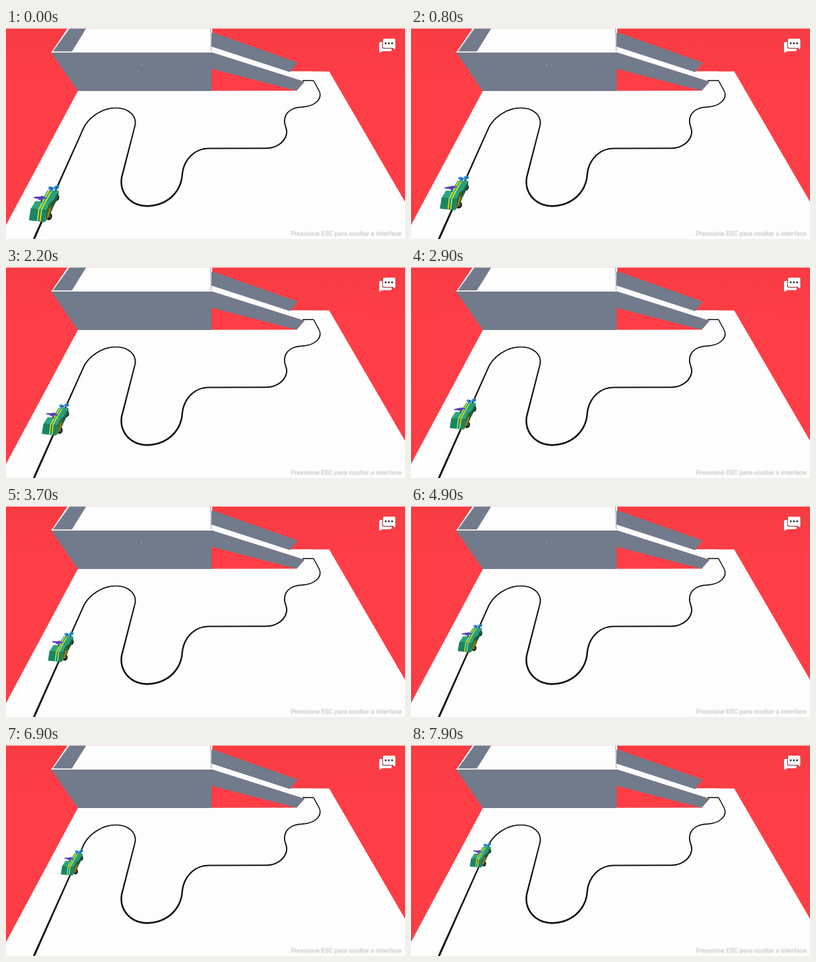
Recreate the animation shown at these times as an HTML page with a canvas. Size 600 px wide and 318 px high, loop 8 s.

```html
<!DOCTYPE html>
<html lang="pt">
<head>
<meta charset="utf-8">
<style>
html, body { margin: 0; width: 600px; height: 318px; overflow: hidden; background: #fdfdfd; }
canvas { position: absolute; left: 0; top: 0; }
#hint {
  position: absolute; right: 5px; bottom: 2px; white-space: nowrap;
  font: 9.8px/12px Roboto, "Liberation Sans", sans-serif;
  color: #d6d6d6; text-shadow: 0 0 2px #c4c4c4;
}
</style>
</head>
<body>
<canvas id="stage" width="600" height="318"></canvas>
<div id="hint">Pressione ESC para ocultar a interface</div>
<script>
const ctx = document.getElementById('stage').getContext('2d');
const W = 600, H = 318, LOOP = 8000, STEP = 100;
const WHITE = '#fdfdfd', GRAY = '#727b8b';

const track = new Path2D(
  'M42 318L117 150C125 134 145 120.5 165 120.5C184 120.5 197 132 194 147' +
  'L174 225C170 250 189 268.3 212 268.3C240 268.3 263 249 265 221' +
  'C267 199 283 181.5 305 181.5L391 181.2C410 181 423 168 422 155' +
  'C421 147 418 146 419 138C420 127 430 119.5 445 119.2' +
  'C466 118 476 106 471 95L462.5 79.3L446 79.3');

function outline(p) {
  ctx.beginPath();
  for (let i = 0; i < p.length; i += 2) ctx.lineTo(p[i], p[i + 1]);
}

function poly(color, ...p) {
  outline(p);
  ctx.fillStyle = color;
  ctx.fill();
}

function line(color, width, ...p) {
  outline(p);
  ctx.strokeStyle = color;
  ctx.lineWidth = width;
  ctx.stroke();
}

function oval(color, x, y, rx, ry, turn = 0) {
  ctx.fillStyle = color;
  ctx.beginPath();
  ctx.ellipse(x, y, rx, ry, turn, 0, Math.PI * 2);
  ctx.fill();
}

function round(color, x, y, w, h, r) {
  ctx.fillStyle = color;
  ctx.beginPath();
  ctx.roundRect(x, y, w, h, r);
  ctx.fill();
}

// the line gets thinner with distance, so it is drawn in level bands
function drawTrack() {
  const band = 10;
  ctx.strokeStyle = '#111';
  ctx.lineJoin = 'round';
  for (let y = 70; y < H; y += band) {
    ctx.save();
    ctx.beginPath();
    ctx.rect(0, y, W, band);
    ctx.clip();
    ctx.lineWidth = 0.9 + y / 145;
    ctx.stroke(track);
    ctx.restore();
  }
}

function drawScene() {
  const wall = ctx.createLinearGradient(0, 0, 0, H);
  wall.addColorStop(0, '#f83b42');
  wall.addColorStop(0.3, '#ff3e47');
  wall.addColorStop(1, '#fc3d46');
  ctx.fillStyle = wall;
  ctx.fillRect(0, 0, W, H);

  // floor
  poly(WHITE, 108, 95, 437, 94.5, 449, 81, 427, 65.5, 486, 65.5, 600, 262, W, H, 0, H, 0, 297);

  // platform
  poly(WHITE, 93, 0, 309, 0, 309, 38, 68, 37);
  poly(GRAY, 70.5, 35.5, 96, 0, 121, 0, 99, 35.5);
  poly(GRAY, 68, 37, 309, 37, 309, 95, 108, 95);
  line(WHITE, 1.3, 68, 36.4, 309, 36.4);
  line('#9aa1ad', 1, 307.5, 0, 308.5, 35);
  line(WHITE, 1.3, 309.5, 0, 309.5, 20);
  oval('#aab0ba', 204, 55.5, 0.9, 0.7);

  // ramp
  poly(WHITE, 309, 26, 426, 65.5, 462, 65.5, 449, 81, 309, 37);
  poly(GRAY, 309, 7, 316, 8.5, 438.5, 52, 427, 66.5, 309, 28);
  poly(GRAY, 309, 36.5, 449, 81, 437, 94.5, 309, 61.5);
  line('#f6dcdd', 1, 0, 0.5, W, 0.5);
}

function drawChat() {
  round(WHITE, 561, 21, 19, 14, 2);
  poly(WHITE, 561.3, 33, 567, 34.5, 561.3, 37.5);
  round('#8c2a30', 565.7, 16, 20, 15, 2.5);
  round(WHITE, 566.7, 16, 18.8, 14, 2);
  poly(WHITE, 580, 29, 585.5, 27, 585, 32.5);
  for (let i = 0; i < 3; i++) oval('#333', 571 + i * 4.8, 23, 1.5, 1.5);
}

// edges of the car on the stage: a quick start, then steady speed
function carBox(t) {
  const s = t / 1000, e = Math.exp(-s / 0.8);
  return {
    left: 40.6 + 6 * s - 6.6 * e,
    top: 226.2 - 10 * s + 10 * e,
    right: 86.4 + 4.4 * s - 5.4 * e,
    bottom: 280 - 12 * s + 13 * e
  };
}

function wheel(x, y, r) {
  oval('#191b1f', x, y, r, r * 1.18, 0.2);
  oval('#4b4f55', x + 1, y, r * 0.4, r * 0.5);
}

function sensor(x, y, turn) {
  line('#27649a', 1.4, x - 1, y + 5, x, y);
  oval('#2f8ccf', x, y, 4.2, 2.6, turn);
  oval('#1d568d', x + 1, y + 0.3, 1.5, 1.2);
}

// drawn in a 46 by 53 box
function drawCar(t) {
  const { left, top, right, bottom } = carBox(t);
  ctx.save();
  ctx.translate(left, top);
  ctx.scale((right - left) / 46, (bottom - top) / 53);

  wheel(30, 44.5, 4.6);
  wheel(41, 18, 4.1);

  // cab
  poly('#255a3c', 30, 26, 38, 20, 44, 8, 44, 17, 34, 36);
  poly('#25a07c', 18, 23, 28, 8, 44, 8, 38, 20, 32, 26);

  // rear body
  poly('#4f641f', 27, 36, 32, 24, 35, 35, 30, 45, 24, 52.5);
  poly('#2aa77d', 3, 34, 10, 23, 32, 24, 27, 36);
  poly('#178663', 0.5, 50, 3, 34, 27, 36, 24, 52.5);
  line('#0f5f4b', 0.8, 3, 34, 27, 36, 32, 24);
  line('#b49b28', 1.2, 28, 46, 32, 32);

  for (const x of [13, 17]) line('#e6e62d', 1.6, x, 51, x + 2, 35, x + 8, 23.5, x + 17, 8.5);

  // rotor
  const tilt = 0.05 + 0.15 * Math.sin(t / 170);
  line('#35317f', 2, 19, 25, 18.5, 19);
  oval('#4c43b4', 17, 18.3, 10, 1.6, tilt);
  oval('#5f3fba', 18, 18.5, 4.5, 2.2, -0.4);

  sensor(33, 5.2, 0.3);
  sensor(41, 3.6, -0.3);
  ctx.restore();
}

function frame() {
  const t = Math.floor((performance.now() % LOOP) / STEP) * STEP;
  drawScene();
  drawTrack();
  drawChat();
  drawCar(t);
  requestAnimationFrame(frame);
}
frame();
</script>
</body>
</html>
```
